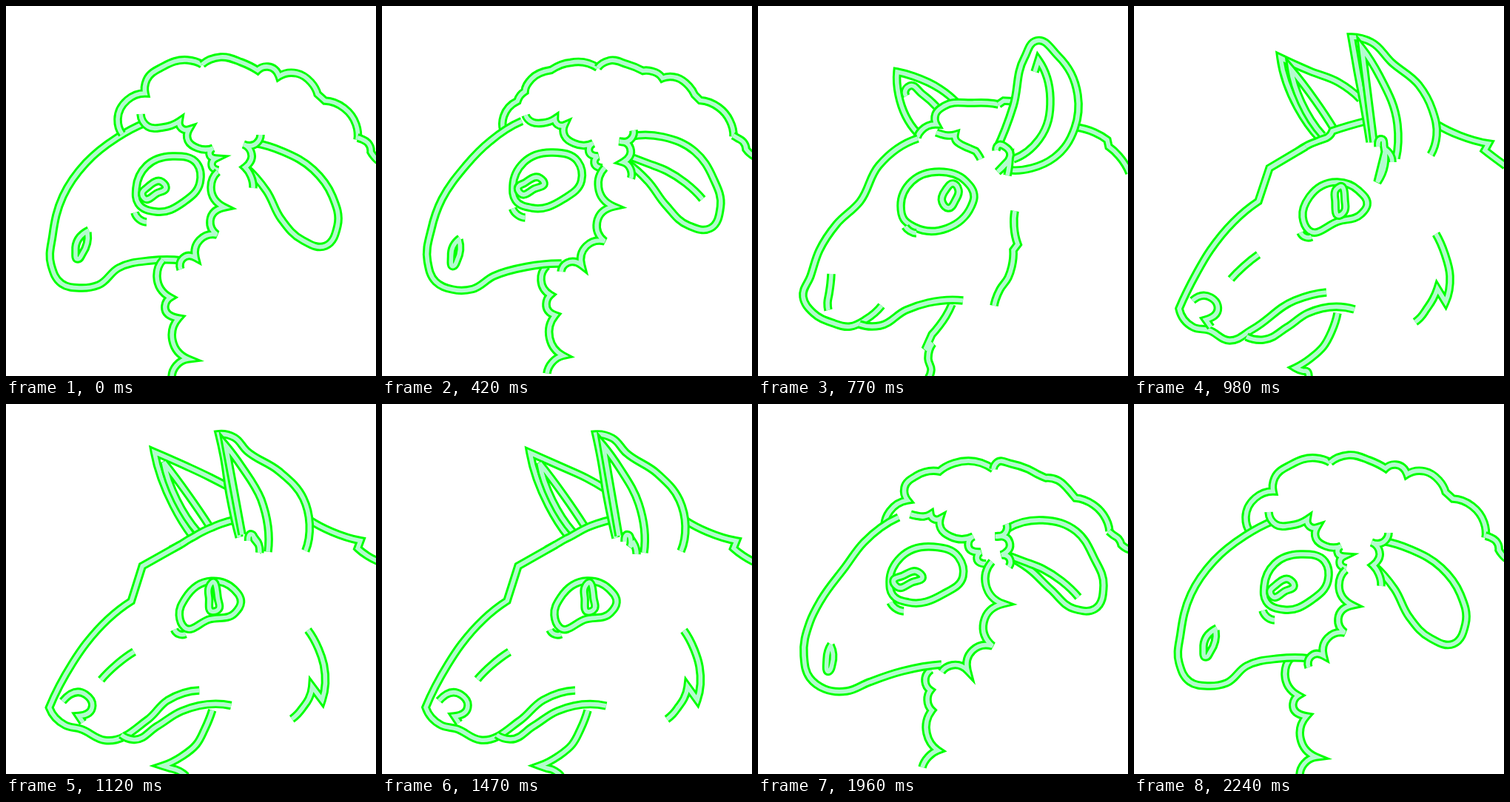
These frames come from a looping animation (500 by 500 pixels, 2.38 s). An HTML page with a canvas:

```html
<!DOCTYPE html>
<html lang="en">
<head>
<meta charset="utf-8">
<title>Sheep and wolf</title>
<style>
html, body { margin: 0; width: 100%; height: 100%; overflow: hidden; background: #fff; }
canvas { display: block; width: 500px; height: 500px; }
</style>
</head>
<body>
<canvas id="stage" width="500" height="500"></canvas>
<script>
const LOOP = 2380, TICK = 70;
// Morph steps (0 sheep, 12 wolf) at which the poses of each part apply.
const KEYS = [0, 4, 5, 7, 10, 11];

// Poses are split by "/", "!" marks a corner, an empty pose hides the part.
const SHAPES = {
  backEar: `//216,121 198,116 177,114 167,128 170,146 177,163
    /267,129 246,112 210,95 188,89! 190,120 215,171
    /306,126 276,103 238,88 198,70! 221,137 250,178
    /302,115 276,100 243,85 200,66! 225,137 251,178`,
  backEarIn: `///241,136 222,119 205,108 200,112 200,122
    /270,166 245,128 212,85! 226,130 255,175
    /273,164 246,124 213,80! 230,130 258,173`,
  neck: `212,343 204,366 222,394! 215,405 233,422! 225,452 246,477! 230,486 224,502
    /234,359 226,375 233,387! 229,400 235,414! 228,445 243,468! 230,477 222,491
    /250,361 242,375 245,388! 237,404 241,414! 238,443 244,464! 234,477 229,490
    /262,403 254,419 245,432 235,444! 226,464! 236,456! 230,477 234,492 230,503
    /275,415 267,440 256,460 240,475 218,489! 228,493 234,494 236,500 236,503
    /278,414 268,440 257,460 238,476 213,489! 222,492 230,494 238,499 242,503`,
  woolLeft: `157,173 151,153 164,127 188,118! 190,100 212,82 245,73 265,79
    /171,163 178,145 202,130! 198,113 214,97 245,91! 265,80 318,88
    /192,155 198,141 226,124! 222,108 240,91 270,85 300,86 330,91
    /215,178 221,168 241,160! 240,146 252,135 290,131 310,131 325,133
    /222,196 235,188 247,183 258,179! 262,177 268,169! 290,162 312,156
    /222,197 235,190 247,183 255,179 262,175 277,167 290,162 312,156`,
  woolRight: `265,79 290,69 318,76 340,87! 354,82 369,95! 393,91 412,103 421,119! 431,128! 457,138 473,160 475,181
    /318,88 323,79 343,81 365,88 378,95 389,100! 405,103 418,114 424,121 429,127! 453,136 467,150 475,172
    /330,91 333,82 350,82 372,91 380,95 389,100! 402,101 415,106 428,116 437,125
    /325,133 332,128! 348,129//`,
  back: `475,178 481,180 489,185 493,197! 497,203 503,209
    /474,172 480,177 487,182 491,190! 496,194 503,197
    //430,164 455,171 472,181! 474,190! 488,203 502,226
    /411,161 440,175 479,186! 474,195! 487,205 502,216
    /411,158 440,173 479,185! 475,195! 488,205 502,213`,
  face: `188,158 150,178 108,212 77,257 63,310 61,350 75,375 100,381 125,377 152,354 195,344 237,344
    /190,153 143,187 118,220 85,265 70,295 62,340 70,370 90,385 120,388 150,376 195,361 248,352
    /206,152 158,182 134,226 92,273 77,305 70,345 77,370 95,385 121,391 152,383 200,367 260,359
    /216,179 163,216 138,264 106,295 83,330 71,365 61,393 75,415 100,428 125,433 145,424 167,405
    /232,190 183,219! 168,264! 103,330 84,362 61,409! 80,434 101,438 129,452 160,437 217,398 260,387
    /235,190 184,219! 169,266! 107,325 89,352 59,410! 80,434 101,439 133,454 186,428 218,400 261,387`,
  jaw: `///137,430 165,432 200,411 230,401 277,398
    /152,447 175,451 207,434 235,415 298,410
    /155,447 173,453 205,435 237,415 303,408`,
  fringe: `182,146 192,163 212,164 234,156! 237,165 247,167! 246,182 259,192 280,192! 275,200 283,206! 278,213 287,222
    /206,149 214,151 224,152 233,149! 237,155 246,155! 247,168 260,179 291,179! 284,190 301,200! 296,207 308,216
    /217,147 224,147 236,144! 244,150 254,150! 254,163 268,175 286,176 297,174! 291,184 316,196! 307,200 316,208
    /241,171 247,173 256,175 266,174! 267,181 274,187 280,190 287,193 294,196! 297,200 301,207//`,
  cheek: `286,224 277,245 295,272! 276,290 285,309! 262,316 256,340! 239,341 236,356
    /316,213 308,245 331,270! 305,295 317,327! 290,333 283,360! 262,353 248,362
    /327,219 322,245 340,269! 316,290 327,329! 302,335 290,364! 280,359 268,358
    /347,277 346,298 351,322! 345,330! 343,352 338,367 327,383 321,397 319,405
    /408,308 420,335 427,365 421,400! 410,382! 404,396 395,410 387,421 380,427
    /408,306 422,332 429,355 426,400! 413,382! 408,398 400,410 393,419 385,426`,
  ear: `335,185 375,197 415,221 441,257 448,297 432,324 400,316 372,288 352,250 324,218
    /338,168 385,157 430,172 454,208 467,245 455,277 428,277 395,250 365,222 340,207
    /336,166 375,138 425,125 465,133 491,150 490,180 465,206 420,216 380,210 343,202
    /322,194 345,135 360,70 376,47 405,67 432,120 428,165 400,205 370,219 343,222
    /319,184 310,130 302,88 294,42! 321,49 348,76 385,107 403,140 409,175 401,201
    /316,181 304,125 296,75 289,41! 311,46 330,66 372,94 402,130 410,165 404,199`,
  earIn: `/339,205 360,213 385,223 410,239 433,261
    /343,190 375,193 410,188 430,178 454,167
    /345,207 380,180 395,125 379,73! 374,89
    /354,206 356,160 332,95 308,57! 324,184
    /354,201 347,135 322,88 299,56! 320,178`,
  tuft: `344,174 340,184 321,187! 331,197 323,218! 331,230 334,246
    /336,162 335,173 321,179! 340,187 329,204! 340,209 339,220
    /339,160 334,171 321,178! 341,184 329,200! 341,206 338,211
    /322,195 325,188 335,191 324,224! 340,207! 339,218 337,229
    /330,190 335,180 338,190 329,238! 340,194! 345,199 349,211
    /328,186 333,177 336,184 335,193! 340,188! 343,195 344,203`,
  eye: `176,246 190,216 225,203 258,213 262,239 240,265 203,278 179,267
    /178,240 193,207 237,193 271,207 277,233 250,257 203,268 182,258
    /188,240 202,205 240,191 278,203 290,226 272,253 213,267 193,258
    /193,270 208,237 245,224 280,236 292,258 288,271 212,299 197,288
    /228,285 237,258 275,238 303,249 315,269 307,281 276,291 236,303
    /233,285 241,262 277,239 307,250 317,268 309,282 275,291 240,302`,
  pupil: `184,253 190,246 211,238 216,245 204,253 187,260
    /183,240 196,232 216,227 222,233 208,241 188,247
    /195,236 207,229 226,226 233,231 221,238 200,242
    /249,265 254,248 264,240 271,249 267,262 257,273
    /272,263 273,248 278,244 285,264 284,278 278,283
    /274,262 274,248 278,242 286,263 286,278 279,281`,
  lid: `174,279 180,288 190,292/179,268 186,276 197,280/188,267 195,276 208,277
    /199,298 205,304 214,307/225,306 231,312 240,312/227,305 233,311 242,311`,
  nostril: `112,303 94,331 97,342 103,335 110,306
    /99,325 93,345 96,361 100,352 98,326
    /107,331 100,358 101,367 105,362 107,347
    /99,362 98,375 96,389 94,401 95,411
    /79,398 104,394 113,405 97,424! 104,434
    /77,401 107,393 116,407 98,422! 104,431`,
  whisker: `////131,369 148,352 168,336/129,372 148,353 172,335`
};
const CLOSED = ['eye', 'pupil'];

const mix = (a, b, k) => a + (b - a) * k;

function parsePose(text) {
  return text.trim().split(/\s+/).filter(Boolean).map(s => {
    const [x, y] = s.split(',').map(parseFloat);
    return { x, y, corner: s.endsWith('!') };
  });
}

// Smooth curve through the points, as a flat list of cubic coordinates.
function toCurve(pts, closed) {
  const n = pts.length, out = [pts[0].x, pts[0].y];
  const at = i => pts[(i + n) % n];
  const dist = (p, q) => Math.hypot(q.x - p.x, q.y - p.y) || 1e-6;
  const tangent = i => {
    const p = at(i);
    if (p.corner || (!closed && (i === 0 || i === n - 1))) return null;
    const a = at(i - 1), b = at(i + 1), d1 = dist(a, p), d2 = dist(p, b);
    const x = (p.x - a.x) * d2 / d1 + (b.x - p.x) * d1 / d2;
    const y = (p.y - a.y) * d2 / d1 + (b.y - p.y) * d1 / d2;
    const len = Math.hypot(x, y) || 1;
    return { x: x / len, y: y / len };
  };
  for (let i = 0; i < (closed ? n : n - 1); i++) {
    const p = at(i), q = at(i + 1), h = dist(p, q) * 0.37;
    const tp = tangent(i), tq = tangent((i + 1) % n);
    let c1 = tp && { x: p.x + tp.x * h, y: p.y + tp.y * h };
    let c2 = tq && { x: q.x - tq.x * h, y: q.y - tq.y * h };
    // A free end bends towards the handle of the other end.
    const free = (from, to, c) => c
      ? { x: from.x + (to.x + 1.5 * (c.x - to.x) - from.x) * 2 / 3,
          y: from.y + (to.y + 1.5 * (c.y - to.y) - from.y) * 2 / 3 }
      : { x: mix(from.x, to.x, 1 / 3), y: mix(from.y, to.y, 1 / 3) };
    const h1 = c1 || free(p, q, c2), h2 = c2 || free(q, p, c1);
    out.push(h1.x, h1.y, h2.x, h2.y, q.x, q.y);
  }
  return out;
}

function makePart([name, text]) {
  const closed = CLOSED.includes(name);
  const poses = text.split('/').map(parsePose);
  const size = Math.max(...poses.map(p => p.length));
  const curves = poses.map(p => {
    if (!p.length) return null;
    const curve = toCurve(p, closed), end = curve.slice(-2);
    while (curve.length < 2 + 6 * (closed ? size : size - 1)) curve.push(...end);
    return curve;
  });
  return { name, closed, curves };
}

const parts = Object.entries(SHAPES).map(makePart);
const faceFirst = [...parts].sort((a, b) => (b.name === 'face') - (a.name === 'face'));
const ctx = document.getElementById('stage').getContext('2d');
ctx.miterLimit = 4;

function curveAt(part, step) {
  let i = 0;
  while (i < KEYS.length - 2 && step >= KEYS[i + 1]) i++;
  const k = (step - KEYS[i]) / (KEYS[i + 1] - KEYS[i]);
  const a = part.curves[i], b = part.curves[i + 1];
  if (a && b) return a.map((v, j) => mix(v, b[j], k));
  return k < 0.5 ? a : b;
}

function drawPart(part, step) {
  const c = curveAt(part, step);
  if (!c) return;
  ctx.beginPath();
  ctx.moveTo(c[0], c[1]);
  for (let i = 2; i < c.length; i += 6) ctx.bezierCurveTo(...c.slice(i, i + 6));
  if (part.closed) ctx.closePath();
  for (const [color, width] of [['#00ff00', 11.5], ['#b4fbcf', 5.6]]) {
    ctx.strokeStyle = color;
    ctx.lineWidth = width;
    ctx.stroke();
  }
}

function stepAt(t) {
  const n = t < 1470 ? Math.floor((t - 280) / TICK) : 12 - Math.floor((t - 1400) / TICK);
  return Math.min(11.25, Math.max(0, n));
}

const start = performance.now();
function frame() {
  const t = (performance.now() - start) % LOOP;
  ctx.fillStyle = '#fff';
  ctx.fillRect(0, 0, 500, 500);
  for (const part of t < 140 ? faceFirst : parts) drawPart(part, stepAt(t));
  requestAnimationFrame(frame);
}
frame();
</script>
</body>
</html>
```
